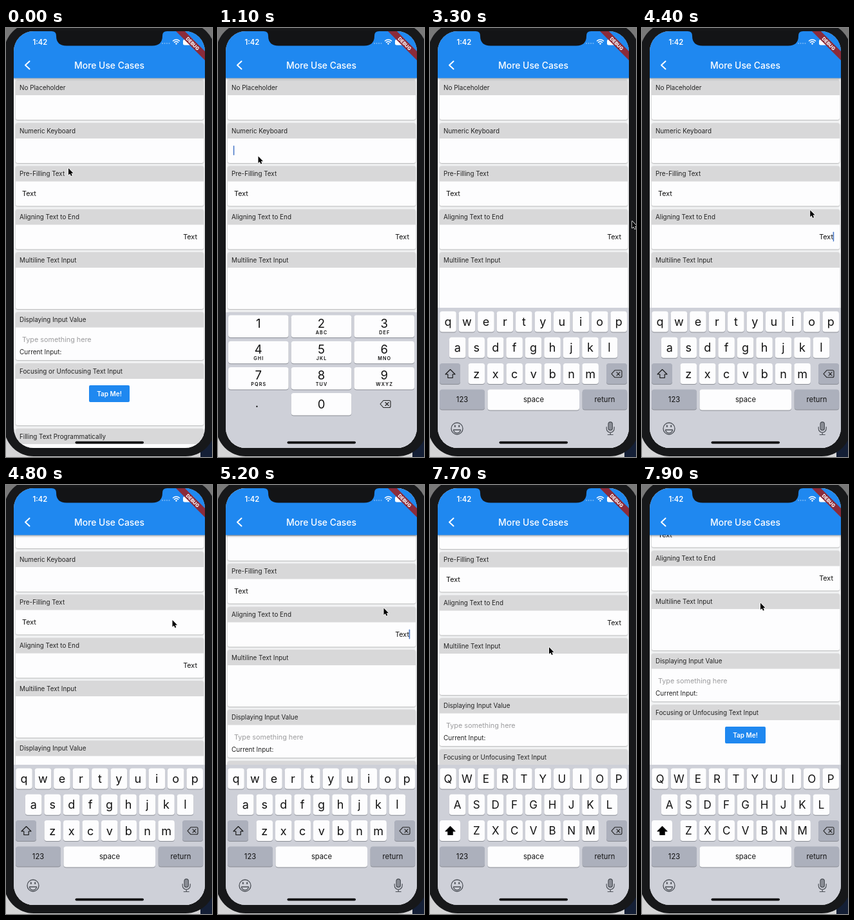
Animation of 320 by 664 pixels, one loop 8 s. Source, as an HTML page with a canvas:

```html
<!DOCTYPE html>
<html lang="en">
<head>
<meta charset="utf-8">
<title>Text input use cases</title>
<style>
  html, body { margin: 0; width: 100%; height: 100%; overflow: hidden; background: #17181a; }
  canvas { display: block; width: 320px; height: 664px; }
</style>
</head>
<body>
<canvas id="stage"></canvas>
<script>
const LOOP = 8000, STEP = 100;
const BLUE = '#1f88f0', KEY_BG = '#ced0d8', KEY_GRAY = '#acb0bc', ICON = '#4d5158';
const SCREEN = { x: 12, y: 5, w: 297, h: 645 };

const canvas = document.getElementById('stage');
const ctx = canvas.getContext('2d');
const ratio = window.devicePixelRatio || 1;
canvas.width = 320 * ratio;
canvas.height = 664 * ratio;

// y is the centre of the header, h the distance from there to the card's bottom
const cards = [
  { title: 'No Placeholder', y: 92, h: 50 },
  { title: 'Numeric Keyboard', y: 159, h: 50 },
  { title: 'Pre-Filling Text', y: 225.5, h: 50, value: 'Text' },
  { title: 'Aligning Text to End', y: 292.5, h: 50, value: 'Text', end: true },
  { title: 'Multiline Text Input', y: 359, h: 76, caretDy: 43.5 },
  { title: 'Displaying Input Value', y: 451.5, h: 62.5, hint: 'Type something here' },
  { title: 'Focusing or Unfocusing Text Input', y: 531, h: 84, button: 'Tap Me!' },
  { title: 'Filling Text Programmatically', y: 632, h: 84 }
];

// [time, value...]
const scrollTrack = [[4600, 0], [4700, 13], [4800, 44], [4900, 63], [5000, 78], [5100, 87],
  [5200, 92], [5400, 93], [7600, 93], [7700, 110], [7800, 147], [7900, 179]];
const mouseTrack = [[0, 97, 217], [600, 60, 190], [1100, 62.5, 198.5], [1800, 60, 212],
  [2200, 52, 254], [2850, 50, 257], [3300, 314, 299], [3650, 317, 308], [4150, 264, 318],
  [4600, 259, 253], [4700, 258.5, 240], [4800, 258.5, 209], [4900, 257.5, 190.5],
  [5200, 257.5, 190.5], [5500, 198, 284], [5900, 192, 287.5], [6700, 192, 287.5],
  [7600, 186, 268], [7700, 185, 251], [7800, 184.5, 214], [7900, 184, 182.5]];
// [time of tap, card]
const taps = [[700, 1], [2350, 2], [4200, 3], [5500, 4], [7100, 4]];

function track(keys, t) {
  const i = keys.findIndex(k => k[0] > t);
  if (i === 0) return keys[0].slice(1);
  if (i < 0) return keys[keys.length - 1].slice(1);
  const a = keys[i - 1], b = keys[i], p = (t - a[0]) / (b[0] - a[0]);
  return a.slice(1).map((v, n) => v + (b[n + 1] - v) * p);
}

// y is the middle of the capitals
function text(str, x, y, size, color = '#222', align = 'left', weight = 400, spacing = 0) {
  ctx.font = `${weight} ${size}px Inter, sans-serif`;
  ctx.letterSpacing = spacing + 'px';
  ctx.textAlign = align;
  ctx.fillStyle = color;
  ctx.fillText(str, x, y + size * 0.364);
}

function box(x, y, w, h, r, color) {
  ctx.fillStyle = color;
  ctx.beginPath();
  ctx.roundRect(x, y, w, h, r);
  ctx.fill();
}

function icon(path, x, y, color, lineWidth) {
  ctx.save();
  ctx.translate(x, y);
  const shape = new Path2D(path);
  if (lineWidth) {
    ctx.strokeStyle = color;
    ctx.lineWidth = lineWidth;
    ctx.lineCap = ctx.lineJoin = 'round';
    ctx.stroke(shape);
  } else {
    ctx.fillStyle = color;
    ctx.fill(shape);
  }
  ctx.restore();
}

function drawCard(card, offset) {
  const y = card.y - offset, top = y - 12;
  ctx.save();
  ctx.shadowColor = 'rgba(0,0,0,.32)';
  ctx.shadowBlur = 2 * ratio;
  ctx.shadowOffsetY = 0.8 * ratio;
  box(15, top, 292, card.h + 12, 3, '#fdfdfe');
  ctx.restore();
  box(15, top, 292, 24, [3, 3, 0, 0], '#d8d8d9');
  text(card.title, 21, y, 9.9);
  if (card.value) {
    text(card.value, card.end ? 297 : 25, y + 30.5, 10.8, '#111', card.end ? 'right' : 'left');
  }
  if (card.hint) {
    text(card.hint, 25, y + 30.5, 10.8, '#9c9c9e');
    text('Current Input:', 21, y + 49.5, 10);
  }
  if (card.button) {
    box(129, y + 22, 63, 26, 2, BLUE);
    text(card.button, 160.5, y + 35, 10, '#fff', 'center', 600);
  }
}

function drawCaret(t, offset) {
  const tap = taps.filter(([start]) => start <= t).pop();
  if (!tap || Math.floor((t - tap[0]) / 500) % 2) return;
  const card = cards[tap[1]];
  const x = card.end ? 296.7 : card.value ? 46.2 : 23.8;
  box(x, card.y + (card.caretDy || 30.5) - 7.5 - offset, 1.5, 15, 0.7, '#4474c6');
}

function drawBanner() {
  ctx.save();
  ctx.translate(309, 5);
  ctx.rotate(Math.PI / 4);
  box(-34, 22, 68, 9.8, 0, '#8b2b3a');
  text('DEBUG', 0, 27, 7.4, '#fff', 'center', 800);
  ctx.restore();
}

function drawAppBar() {
  ctx.save();
  ctx.shadowColor = 'rgba(0,0,0,.35)';
  ctx.shadowBlur = 3 * ratio;
  ctx.shadowOffsetY = ratio;
  box(12, 5, 297, 72.5, 0, BLUE);
  ctx.restore();
  icon('M4 -6 L-2.5 0 L4 6', 32.5, 57.5, '#fff', 2);
  text('More Use Cases', 160.5, 57.5, 13.9, '#fff', 'center', 500);
  text('1:42', 41.5, 22, 11.2, '#fff', 'left', 600);
  for (let i = 0; i < 4; i++) box(242 + i * 3.5, 22.8, 2, 2, 1, 'rgba(255,255,255,.4)');
  icon('M-5 -4.5 A7 7 0 0 1 5 -4.5 M-3 -2.2 A4.3 4.3 0 0 1 3 -2.2', 264.5, 24.5, '#fff', 1.5);
  icon('M-1.7 -.6 A2.4 2.4 0 0 1 1.7 -.6 L0 1.4 Z', 264.5, 24.7, '#fff');
  box(275, 17.8, 17, 8.6, 2.5, '#fff');
  drawBanner();
}

function key(x, y, w, h = 32, color = '#fdfdfe') {
  box(x, y + 1, w, h, 4, '#8b8e96');
  box(x, y, w, h, 4, color);
}

function drawDelete(x, y) {
  icon('M-8 0 L-3 -5.5 H6 Q8 -5.5 8 -3.5 V3.5 Q8 5.5 6 5.5 H-3 Z M0 -2.5 L5 2.5 M5 -2.5 L0 2.5',
    x, y, '#222', 1.1);
}

function drawNumberPad(dy) {
  ctx.save();
  ctx.translate(0, dy);
  box(12, 440, 297, 212, 0, KEY_BG);
  const letters = ['', 'ABC', 'DEF', 'GHI', 'JKL', 'MNO', 'PQRS', 'TUV', 'WXYZ'];
  letters.forEach((label, i) => {
    const x = 16 + (i % 3) * 97.7, y = 444.5 + Math.floor(i / 3) * 40.2;
    key(x, y, 93.6, 34.5);
    text(i + 1, x + 46.8, y + 12.5, 18.5, '#111', 'center');
    text(label, x + 47.3, y + 26.5, 7.2, '#111', 'center', 600, 1.1);
  });
  key(113.7, 565, 93.6, 34.5);
  text('0', 160.5, 582, 18.5, '#111', 'center');
  text('.', 60.5, 580.5, 18.5, '#111', 'center');
  drawDelete(260, 582);
  ctx.restore();
}

function drawLetterKeys(caps) {
  box(12, 433, 297, 217, 0, KEY_BG);
  [['qwertyuiop', 28], ['asdfghjkl', 42.7], ['zxcvbnm', 72.3]].forEach(([row, x0], r) => {
    [...row].forEach((char, i) => {
      const x = x0 + i * 29.47, y = 438.5 + r * 40.3;
      key(x - 12.8, y, 25.6);
      text(caps ? char.toUpperCase() : char, x, y + 16, caps ? 17 : 18, '#111', 'center');
    });
  });
  key(15, 519.1, 32, 32, caps ? '#fdfdfe' : KEY_GRAY);
  const arrow = 'M0 -7 L7.5 0.5 H3.7 V6 H-3.7 V0.5 H-7.5 Z';
  if (caps) icon(arrow, 31.5, 535.5, '#000');
  icon(arrow, 31.5, 535.5, '#111', 1.1);
  key(274, 519.1, 32, 32, KEY_GRAY);
  drawDelete(290, 535.3);
  key(15, 559.4, 70, 31, KEY_GRAY);
  key(89.5, 559.4, 142.5);
  key(236.7, 559.4, 69.5, 31, KEY_GRAY);
  text('123', 50, 575, 11.2, '#111', 'center');
  text('space', 161, 575, 11.2, '#111', 'center');
  text('return', 271.5, 575, 11.2, '#111', 'center');

  icon('M9 0 A9 9 0 1 1 -9 0 A9 9 0 1 1 9 0 M-5.5 2 H5.5 A5.5 4.8 0 0 1 -5.5 2 Z', 42, 620, ICON, 1.3);
  box(37.8, 614.5, 2, 3.4, 1, ICON);
  box(44.2, 614.5, 2, 3.4, 1, ICON);
  box(277, 609.5, 6.4, 13, 3.2, '#8a8d95');
  icon('M-3.2 -7 A3.2 3.2 0 0 1 3.2 -7 V-.5 A3.2 3.2 0 0 1 -3.2 -.5 Z M-6 -2.5 V0 A6 6 0 0 0 6 0 V-2.5 M0 6 V9.5 M-4 9.5 H4',
    280.2, 620, ICON, 1.2);
}

function drawKeyboard(t) {
  if (t >= 2400) return drawLetterKeys(t >= 5600);
  const p = Math.min(1, Math.max(0, (t - 700) / 400));
  if (p) drawNumberPad(212 * (1 - p) ** 3);
}

function drawBody() {
  const wall = ctx.createLinearGradient(0, 0, 0, 664);
  wall.addColorStop(0, '#777');
  wall.addColorStop(1, '#d5d5d6');
  ctx.fillStyle = wall;
  ctx.fillRect(0, 0, 320, 664);
  box(302, 600, 18, 64, 0, '#141f36');
  box(-3, -8, 328, 671, 46, '#17181a');
}

function drawNotch() {
  icon('M71 4 V5 Q78 5 78 12 Q78 27.5 94 27.5 H227 Q243 27.5 243 12 Q243 5 250 5 V4 Z', 0, 0, '#131416');
}

function drawMouse(x, y) {
  const arrow = 'M0 0 V10.6 L2.4 8.4 L4 12 L5.8 11.2 L4.2 7.7 H7.5 Z';
  icon(arrow, x, y, '#fff', 1.4);
  icon(arrow, x, y, '#000');
}

function draw(t) {
  const [offset] = track(scrollTrack, t);
  ctx.setTransform(ratio, 0, 0, ratio, 0, 0);
  drawBody();
  ctx.save();
  ctx.beginPath();
  ctx.roundRect(SCREEN.x, SCREEN.y, SCREEN.w, SCREEN.h, 31);
  ctx.clip();
  box(12, 5, 297, 645, 0, '#f4f5f6');
  cards.forEach(card => drawCard(card, offset));
  drawCaret(t, offset);
  drawAppBar();
  drawKeyboard(t);
  box(107.5, 639.7, 106.5, 3.8, 1.9, '#0c0c0e');
  ctx.restore();
  drawNotch();
  drawMouse(...track(mouseTrack, t));
}

const start = performance.now();
function frame() {
  const t = (performance.now() - start) % LOOP;
  draw(Math.floor(t / STEP) * STEP);
  requestAnimationFrame(frame);
}
frame();
</script>
</body>
</html>
```
